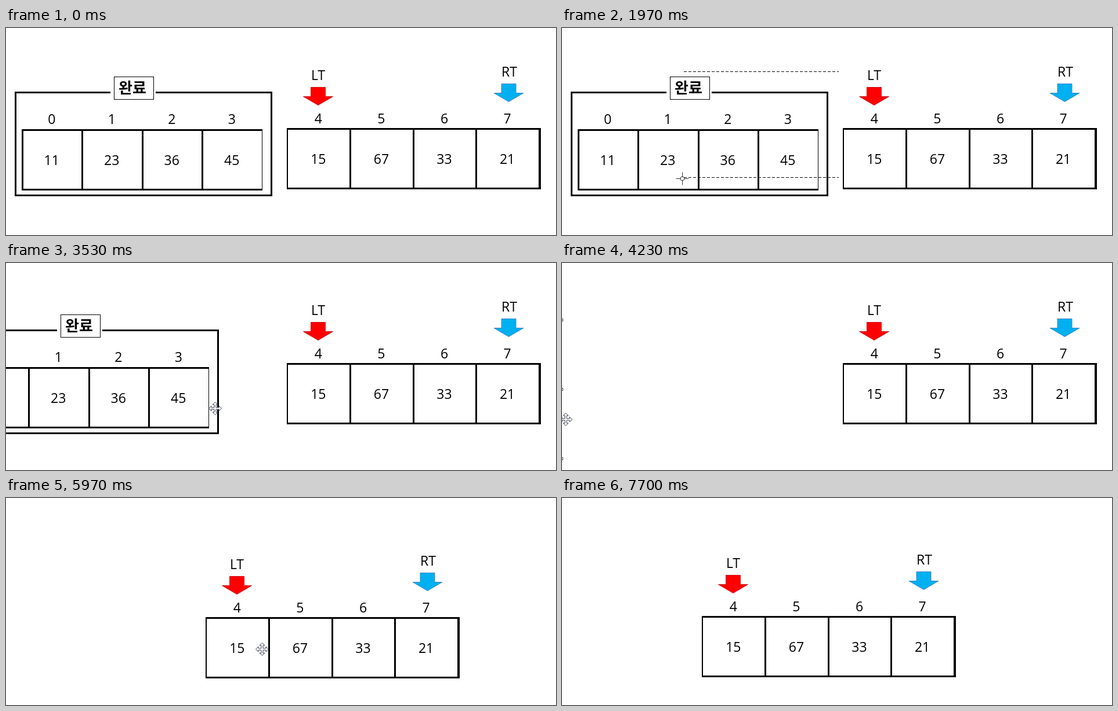
An HTML page that plays this animation: 948x358 px, repeating every 8 s.

```html
<!DOCTYPE html>
<html lang="ko">
<head>
<meta charset="utf-8">
<title>Sorting steps</title>
<style>
  html, body { margin: 0; width: 100%; height: 100%; overflow: hidden; background: #fff; }
  svg { display: block; width: 948px; height: 358px; }
  text { font: 23px "Open Sans", "Noto Sans", sans-serif; text-anchor: middle; }
  .label { font: bold 26px "Noto Sans CJK KR", "Noto Sans CJK", sans-serif; }
  .handle { fill: #fff; stroke: #555; }
</style>
</head>
<body>
<svg viewBox="0 0 948 358">
  <defs>
    <path id="arrow" d="M525.5 102.5h25v16h13l-25.5 15l-25.5 -15h13z"/>
    <path id="arm" d="M.5 -10.5V-2"/>
    <path id="head" d="M-1.5 -1.5V-6.5H-4.5L0 -11L4.5 -6.5H1.5V-1.5"/>
  </defs>
  <g id="done">
    <rect x="16.5" y="111.5" width="441" height="178" fill="none" stroke="#000" stroke-width="3"/>
    <rect x="180" y="106" width="78" height="10" fill="#fff"/>
    <rect x="186.5" y="84.5" width="68" height="39" fill="#fff" stroke="#000"/>
    <text class="label" x="218" y="113">완료</text>
  </g>
  <g id="todo">
    <use href="#arrow" fill="#f00" stroke="#c8141e"/>
    <use href="#arrow" fill="#00b0f0" stroke="#4a86c5" transform="translate(328.5 -6)"/>
    <text x="538" y="90">LT</text>
    <text x="867.5" y="84">RT</text>
  </g>
  <g id="doneHandles"></g>
  <g id="todoHandles"></g>
  <path id="marquee" stroke="#000" stroke-dasharray="5 3"/>
  <g id="cross" fill="none" stroke="#333"><circle cx=".5" cy=".5" r="3.5"/></g>
  <g id="move" fill="#fff" stroke="#3b4050"></g>
</svg>
<script>
const LOOP = 8000;
const $ = id => document.getElementById(id);

function add(parent, tag, attrs, text = '') {
  const node = document.createElementNS('http://www.w3.org/2000/svg', tag);
  for (const name in attrs) node.setAttribute(name, attrs[name]);
  node.textContent = text;
  parent.append(node);
}

// A row of boxed values with an index above each.
function addCells(group, { left, top, step, indexY, firstLine, lastLine, first, values }) {
  const height = 106, count = values.length;
  const lineX = i => Math.floor(left + i * step);
  const bar = (x, y, width, height) => add(group, 'rect', { x, y, width, height });
  for (let i = 0; i <= count; i++)
    bar(lineX(i), top, i === 0 ? firstLine : i === count ? lastLine : 3, height);
  for (const y of [top, top + height - 3]) bar(left, y, lineX(count) + lastLine - left, 3);
  values.forEach((value, i) => {
    const x = left + (i + .5) * step;
    add(group, 'text', { x, y: indexY }, first + i);
    add(group, 'text', { x, y: top + 62 }, value);
  });
}

// Handles around a box: corners and edge midpoints.
function addHandles(group, left, top, width, height) {
  for (let i = 0; i < 3; i++)
    for (let j = 0; j < 3; j++)
      if (i !== 1 || j !== 1)
        add(group, 'rect', { class: 'handle', width: 4, height: 4,
          x: left + i * width / 2 - 2, y: top + j * height / 2 - 2 });
}

addCells($('done'), { left: 27, top: 175, step: 103.5, indexY: 166,
  firstLine: 3, lastLine: 1, first: 0, values: [11, 23, 36, 45] });
addCells($('todo'), { left: 484, top: 173, step: 108.6, indexY: 165,
  firstLine: 2, lastLine: 4, first: 4, values: [15, 67, 33, 21] });
addHandles($('doneHandles'), -470.5, 98.5, 470, 240);
addHandles($('todoHandles'), 158.5, 78.5, 528, 256);
for (const turn of [0, 90, 180, 270]) {
  add($('cross'), 'use', { href: '#arm', transform: `rotate(${turn} .5 .5)` });
  add($('move'), 'use', { href: '#head', transform: `rotate(${turn})` });
}

// Each move is [start, end, x, y]; positions hold between moves.
const cursorMoves = [
  [670, 1130, 476, 81], [1370, 1470, 477, 76],
  [1700, 1970, 208, 260], [1970, 2660, 10, 314],
  [2970, 3330, 447, 246], [3500, 3800, 4, 271],
  [4230, 5000, 928, 48], [5070, 5500, 474, 304], [5560, 5870, 591, 230],
  [5900, 5970, 441, 261], [5970, 6500, 349, 261],
  [6730, 6970, 831, 37], [7000, 7500, 670, -7], [7570, 7690, 679, -7]
];
const doneMoves = [[3500, 3800, -470, 25]];
const todoMoves = [[5900, 5970, -140, 33], [5970, 6500, -242, 31], [6500, 6530, -243, 31]];

const easeOut = p => 1 - (1 - p) ** 2;

function follow(moves, t, x = 0, y = 0) {
  for (const [start, end, toX, toY] of moves) {
    if (t < start) break;
    const p = easeOut(Math.min(1, (t - start) / (end - start)));
    x += (toX - x) * p;
    y += (toY - y) * p;
  }
  return [Math.round(x), Math.round(y)];
}

const within = (t, ...spans) => spans.some(([from, to]) => t >= from && t < to);
const place = (id, [x, y]) => $(id).setAttribute('transform', `translate(${x} ${y})`);
const show = (id, visible) => $(id).setAttribute('visibility', visible ? 'visible' : 'hidden');

function draw(t) {
  const [x, y] = follow(cursorMoves, t, 341, 356);
  place('done', follow(doneMoves, t));
  place('todo', follow(todoMoves, t));
  place('cross', [x, y]);
  place('move', [x + .5, y + .5]);

  const visible = within(t, [670, 3800], [4230, 6970], [7570, 7695]);
  const moving = within(t, [3300, 3800], [4230, 4250], [5840, 6760]);
  show('cross', visible && !moving);
  show('move', visible && moving);
  show('doneHandles', within(t, [4070, 5070]));
  show('todoHandles', within(t, [6730, 7370]));

  // Only the horizontal sides of the selection are drawn.
  const [startX, startY] = t < 4000 ? [477, 75.5] : [928, 47.5];
  const left = Math.min(x + 3, startX), bottom = Math.max(y - 1.5, startY);
  $('marquee').setAttribute('d', `M${left} ${startY}H${startX}M${left} ${bottom}H${startX}`);
  show('marquee', within(t, [1710, 2800], [5080, 5560]));
}

const start = performance.now();
function tick() {
  draw((performance.now() - start) % LOOP);
  requestAnimationFrame(tick);
}
tick();
</script>
</body>
</html>
```
